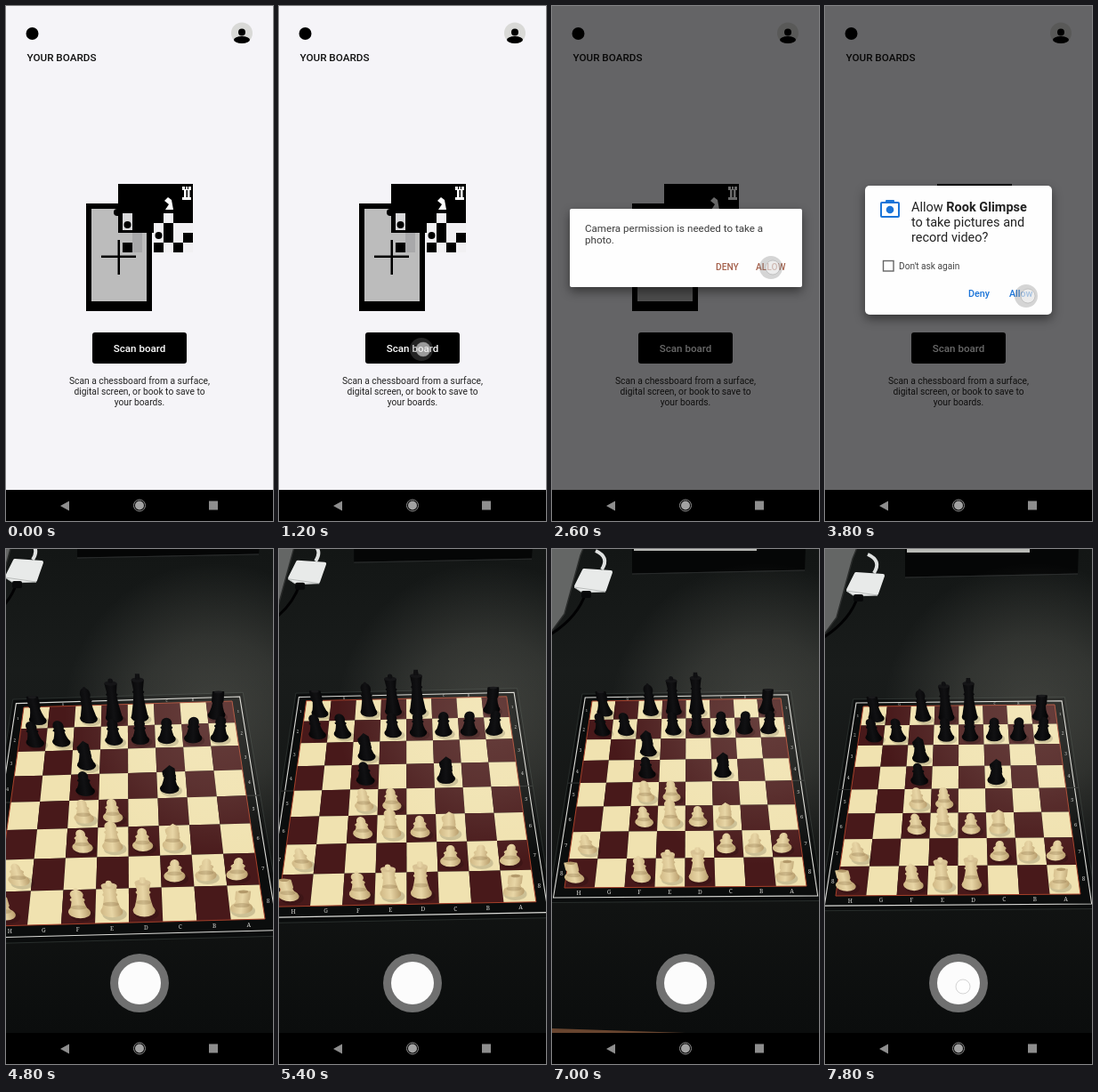
Recreate the animation shown at these times as an HTML page with a canvas. Size 300 by 579 pixels, loop 8000 ms.

```html
<!DOCTYPE html>
<html lang="en">
<head>
<meta charset="utf-8">
<title>Board scanner</title>
<style>
html, body { margin: 0; width: 100%; height: 100%; overflow: hidden; background: #000; }
canvas { display: block; width: 100%; height: 100%; }
</style>
</head>
<body>
<canvas id="stage"></canvas>
<script>
const W = 300, H = 579, LOOP = 8000, STEP = 200, NAV_TOP = 544;
const canvas = document.getElementById('stage');
const ctx = canvas.getContext('2d');
const ratio = window.devicePixelRatio || 1;
canvas.width = W * ratio;
canvas.height = H * ratio;

// ---------- drawing helpers ----------
function rect(x, y, w, h, color, radius = 0) {
  ctx.fillStyle = color;
  ctx.beginPath();
  ctx.roundRect(x, y, w, h, radius);
  ctx.fill();
}
function ellipse(x, y, rx, ry, color) {
  ctx.fillStyle = color;
  ctx.beginPath();
  ctx.ellipse(x, y, rx, ry, 0, 0, Math.PI * 2);
  ctx.fill();
}
const disc = (x, y, r, color) => ellipse(x, y, r, r, color);

function poly(points, fill, stroke, width = 1) {
  ctx.beginPath();
  points.forEach(([x, y]) => ctx.lineTo(x, y));
  ctx.closePath();
  if (fill) { ctx.fillStyle = fill; ctx.fill(); }
  if (stroke) { ctx.strokeStyle = stroke; ctx.lineWidth = width; ctx.stroke(); }
}
function curve(x0, y0, cx, cy, x1, y1, color, width) {
  ctx.beginPath();
  ctx.moveTo(x0, y0);
  ctx.quadraticCurveTo(cx, cy, x1, y1);
  ctx.strokeStyle = color;
  ctx.lineWidth = width;
  ctx.stroke();
}
function text(str, x, y, size, color, weight = 400, align = 'left', family = 'Roboto, sans-serif') {
  ctx.font = `${weight} ${size}px ${family}`;
  ctx.textAlign = align;
  ctx.fillStyle = color;
  ctx.fillText(str, x, y);
  return ctx.measureText(str).width;
}
function withAlpha(alpha, draw) {
  if (alpha <= 0) return;
  ctx.save();
  ctx.globalAlpha = alpha;
  draw();
  ctx.restore();
}
function card(x, y, w, h, radius) {
  ctx.save();
  ctx.shadowColor = 'rgba(0,0,0,.45)';
  ctx.shadowBlur = 12 * ratio;
  ctx.shadowOffsetY = 5 * ratio;
  rect(x, y, w, h, '#fefefe', radius);
  ctx.restore();
}
function touch(x, y, halo = 'rgba(120,120,120,.3)') {
  disc(x, y, 13, halo);
  disc(x + 2, y, 8, 'rgba(255,255,255,.55)');
  ctx.strokeStyle = 'rgba(150,150,150,.4)';
  ctx.lineWidth = 1;
  ctx.stroke();
}

// ---------- app screens ----------
function illustration() {
  rect(90, 222, 74, 121, '#000');
  rect(96, 228, 62, 104, '#bcbcbc');
  rect(126, 200, 84, 33, '#000');
  rect(121, 228, 10, 8, '#000', 4);
  rect(126, 233, 84, 22, '#000');
  [[177, 233], [166, 244], [188, 244], [199, 244], [166, 255], [188, 255], [177, 266], [199, 266]]
    .forEach(([x, y]) => rect(x, y, 11, 11, '#f1f0f3'));
  [[177, 255], [199, 255], [166, 266], [188, 266], [131, 266]]
    .forEach(([x, y]) => rect(x, y, 11, 11, '#000'));
  rect(131, 233, 11, 19, '#d8d8da');
  rect(142, 255, 11, 22, '#a8a8aa');
  disc(136.5, 246, 4, '#000');
  disc(171.5, 258, 4, '#000');
  // rook and knight outlines
  [[198, 203, 3, 4], [202, 203, 2, 4], [205, 203, 3, 4], [200, 206, 2.5, 10], [204, 206, 2.5, 10], [198, 215, 10, 3]]
    .forEach(([x, y, w, h]) => rect(x, y, w, h, '#fff'));
  poly([[178, 219], [182, 215], [186, 218], [188, 229], [179, 229], [183, 223]], '#fff');
  rect(107, 280.5, 39, 2.5, '#000');
  rect(125.5, 263, 2.5, 39, '#000');
}

function home() {
  rect(0, 0, W, H, '#f5f4f8');
  disc(29.5, 31, 7, '#000');
  text('YOUR BOARDS', 23.5, 62, 11.7, '#111', 500);
  disc(265, 30.5, 12, '#d9d9d7');
  disc(265, 29.5, 4, '#000');
  ellipse(265, 38, 9, 4, '#000');
  illustration();
  rect(97, 367, 106, 35, '#000', 3);
  text('Scan board', 150, 389, 11.6, '#fff', 500, 'center');
  ['Scan a chessboard from a surface,', 'digital screen, or book to save to', 'your boards.']
    .forEach((line, i) => text(line, 150, 424.5 + 12 * i, 10.25, '#222', 400, 'center'));
}

function permissionDialog() {
  card(20, 228, 261, 88, 2);
  text('Camera permission is needed to take a', 37, 253.5, 11.6, '#3c3c3c');
  text('photo.', 37, 267, 11.6, '#3c3c3c');
  text('DENY', 184, 297, 10.2, '#a5614c', 500);
  text('ALLOW', 229, 297, 10.2, '#a5614c', 500);
}

function systemDialog() {
  const blue = '#1b74d8';
  card(45, 202, 210, 145, 5);
  rect(68, 218, 10, 5, blue, 1);
  rect(62, 220, 22, 18, blue, 2);
  rect(64, 222, 18, 14, '#fefefe');
  disc(73, 229, 4.3, blue);
  const lead = text('Allow ', 97, 231, 14.5, '#222');
  text('Rook Glimpse', 97 + lead, 231, 14.5, '#222', 700);
  text('to take pictures and', 97, 248, 14.5, '#222');
  text('record video?', 97, 265, 14.5, '#222');
  ctx.strokeStyle = '#666';
  ctx.lineWidth = 1.4;
  ctx.strokeRect(65.5, 286.5, 11.5, 11.5);
  text("Don't ask again", 83, 296, 10.15, '#444');
  text('Deny', 161, 327, 10.8, blue, 500);
  text('Allow', 207, 327, 10.6, blue, 500);
}

function navBar() {
  rect(0, NAV_TOP, W, H - NAV_TOP, '#000');
  poly([[61, 562], [71, 556.5], [71, 567.5]], '#8e8e8e');
  disc(150, 561.5, 5, '#a2a2a2');
  ctx.beginPath();
  ctx.arc(150, 561.5, 6.5, 0, Math.PI * 2);
  ctx.strokeStyle = '#8e8e8e';
  ctx.lineWidth = 1;
  ctx.stroke();
  rect(228, 556.5, 10, 10, '#8e8e8e');
}

// ---------- camera view ----------
// time, playing-field corners (TL, TR, BR, BL), adapter centre, box bottom, table edge
const POSES = [
  [4800, 20, 178, 254, 171, 291, 416, -14, 424, 21, 24, 10, 610],
  [6200, 45, 161, 258, 159, 286, 371, 16, 373, 47, 28, 22, 531],
  [7000, 45, 171, 257, 168, 286, 379, 14, 381, 47, 35, 28, 539],
  [7800, 43, 177, 258, 175, 287, 388, 12, 390, 46, 39, 32, 560],
];
function poseAt(t) {
  if (t <= POSES[0][0]) return POSES[0].slice(1);
  const i = POSES.findIndex(p => p[0] >= t);
  const a = POSES[i - 1], b = POSES[i];
  const k = (t - a[0]) / (b[0] - a[0]);
  return a.slice(1).map((v, j) => v + (b[j + 1] - v) * k);
}

// maps board units 0..8 onto the four corners
function projection([x0, y0, x1, y1, x2, y2, x3, y3]) {
  const ax = x1 - x2, ay = y1 - y2, bx = x3 - x2, by = y3 - y2;
  const sx = x0 - x1 + x2 - x3, sy = y0 - y1 + y2 - y3;
  const det = ax * by - bx * ay;
  const g = (sx * by - bx * sy) / det, h = (ax * sy - sx * ay) / det;
  return (col, row) => {
    const u = col / 8, v = row / 8, d = g * u + h * v + 1;
    return [((x1 - x0 + g * x1) * u + (x3 - x0 + h * x3) * v + x0) / d,
            ((y1 - y0 + g * y1) * u + (y3 - y0 + h * y3) * v + y0) / d];
  };
}

const SETUP = ['r.bqk..r', 'pp.ppppp', '..n.....', '..p..n..', '..PP....', '..PBPN..', 'P....PPP', 'R.BQK..R'];
const HEIGHT = { p: 25, r: 27, n: 29, b: 34, q: 42, k: 45 };

function piece(symbol, x, y, w, scale) {
  const kind = symbol.toLowerCase(), white = symbol !== kind, h = HEIGHT[kind] * scale;
  const color = ctx.createLinearGradient(-w, 0, w, 0);
  (white ? ['#d0b885', '#e8d6a6', '#b89d6c'] : ['#050506', '#111113', '#020203'])
    .forEach((c, i) => color.addColorStop(i / 2, c));
  ctx.save();
  ctx.translate(x, y);
  ellipse(w * .2, -w * .25, w * 1.1, w * .6, 'rgba(0,0,0,.15)');
  ctx.transform(1, 0, (190 - x) * .0016, 1, 0, 0);
  ellipse(0, -w * .5, w, w * .55, color);
  ctx.beginPath();
  ctx.moveTo(-w * .95, -w * .5);
  ctx.quadraticCurveTo(-w * .6, -h * .4, -w * .48, -h * .72);
  ctx.lineTo(w * .48, -h * .72);
  ctx.quadraticCurveTo(w * .6, -h * .4, w * .95, -w * .5);
  ctx.fill();
  if (white) ellipse(0, -h * .36, w * .72, w * .2, 'rgba(120,90,50,.25)');
  ellipse(0, -h * .62, w * .68, w * .25, color);
  if (kind === 'p') disc(0, -h * .79, h * .21, color);
  if (kind === 'b') { ellipse(0, -h * .8, w * .6, h * .17, color); disc(0, -h * .96, w * .17, color); }
  if (kind === 'r') {
    rect(-w * .68, -h * .98, w * 1.36, h * .36, color, 1);
    ellipse(0, -h * .95, w * .45, w * .15, white ? '#b3996a' : '#1a1a1c');
  }
  if (kind === 'n') {
    poly([[-w * .5, -h * .45], [-w * .1, -h * .7], [-w * .7, -h * .64], [-w * .75, -h * .78],
          [0, -h], [w * .55, -h * .88], [w * .7, -h * .45]], color);
  }
  if (kind === 'q' || kind === 'k') {
    poly([[-w * .5, -h * .6], [-w * .72, -h * .87], [w * .72, -h * .87], [w * .5, -h * .6]], color);
    ellipse(0, -h * .87, w * .72, w * .27, white ? '#d8c294' : '#151517');
    disc(0, -h * .93, w * .28, color);
    if (kind === 'k') rect(-w * .25, -h, w * .5, h * .12, color);
  }
  ctx.restore();
}

// soft lamp reflection on the right of the table and board
function glare() {
  const light = ctx.createRadialGradient(235, 185, 0, 235, 185, 170);
  [.17, .11, 0].forEach((a, i) => light.addColorStop(i / 2, `rgba(255,250,230,${a})`));
  rect(0, 0, W, NAV_TOP, light);
}

function chessboard(corners) {
  const at = projection(corners);
  const quad = (l, t, r, b) => [at(l, t), at(r, t), at(r, b), at(l, b)];
  const scale = (corners[4] - corners[6]) / 270;
  const label = (str, col, row, size) => {
    const [x, y] = at(col, row);
    text(str, x, y + size * .35, size, '#d8d8d4', 400, 'center', '"Noto Serif", serif');
  };
  poly(quad(-.47, -.4, 8.47, 8.48), '#0b0d0d', '#303634', .8);
  poly(quad(-.32, -.2, 8.32, 8.32), null, '#dcdcd8', 1.1);
  [[-.47, 0], [8, 8.47]].forEach(([a, b]) => poly([at(a, 4), at(b, 4)], null, '#2c2f2e', .8));
  for (let row = 0; row < 8; row++) {
    for (let col = 0; col < 8; col++) {
      poly(quad(col, row, col + 1, row + 1), (row + col) % 2 ? '#48191a' : '#f0e2b0');
    }
  }
  poly(quad(0, 0, 8, 8), null, '#a6402a', 1);
  glare();
  [...'HGFEDCBA'].forEach((letter, i) => {
    label(letter, i + .5, 8.16, 6.5);
    label(letter, i + .5, -.1, 3.5);
    label(String(i + 1), -.17, i + .5, 4 + i * .35);
    label(String(i + 1), 8.17, i + .5, 4 + i * .35);
  });
  SETUP.forEach((line, row) => [...line].forEach((symbol, col) => {
    if (symbol === '.') return;
    // most pieces stand slightly towards the middle files; the corner rook stands outside
    const shift = symbol === 'R' && col === 0 ? -.15 : (3.2 - col) * .05;
    const [x, y] = at(col + .5 + shift, row + .83);
    const unit = at(col + 1, row + .83)[0] - at(col, row + .83)[0];
    piece(symbol, x, y, unit * .33, scale * (1.06 - .03 * row));
  }));
}

function tabletop([ax, ay, boxBottom, edge]) {
  const shade = ctx.createLinearGradient(0, 0, 0, NAV_TOP);
  [[0, '#131615'], [.25, '#191c1b'], [.65, '#131514'], [1, '#0b0d0d']]
    .forEach(([stop, c]) => shade.addColorStop(stop, c));
  rect(0, 0, W, H, shade);
  const left = boxBottom < 22 ? 80 + (boxBottom - 10) * .83 : 90;
  poly([[left, -5], [285, -5], [284, boxBottom - 4], [left, boxBottom]], '#050606');
  if (boxBottom > 24) rect(92, 0, 138, (boxBottom - 24) * .5, '#b9bab6');
  poly([[left, boxBottom], [284, boxBottom - 4]], null, '#2a2d2c', .8);
  poly([[0, edge], [W, edge + 10], [W, H], [0, H]], '#68452f');

  ctx.save();
  ctx.translate(ax, ay);
  poly([[-90, -60], [-2, -60], [-15, -28], [-33, 38], [-47, 57], [-90, 70]], '#646665', '#2b2d2c', 1.5);
  curve(-9, 14, -18, 42, -50, 62, '#020203', 3);
  curve(9, -12, 18, -26, 2, -33, '#dfe1e0', 4);
  ctx.lineJoin = 'round';
  poly([[-20, 7], [-11, -11], [19, -9], [12, 11], [-12, 12]], '#e8eae9', '#e8eae9', 4);
  poly([[-22, 8], [-13, 14], [13, 13]], null, '#b8bbba', 1);
  rect(-14, 12, 11, 8, '#08090a', 2);
  ctx.restore();
}

function camera(t) {
  rect(0, 0, W, H, '#000');
  if (t >= 4600) {
    const pose = poseAt(t);
    tabletop(pose.slice(8));
    chessboard(pose.slice(0, 8));
  }
  disc(150, 488, 33, 'rgba(150,150,150,.72)');
  disc(150, 488, 24, '#fcfcfc');
  if (t >= 7800) touch(153, 492, 'transparent');
}

// ---------- timeline ----------
function drawAt(time) {
  const t = Math.floor(time / STEP) * STEP;
  const during = (from, to) => t >= from && t < to;
  ctx.setTransform(ratio, 0, 0, ratio, 0, 0);
  if (t >= 4200) {
    camera(t);
  } else {
    const ramp = (from, to) => Math.max(0, Math.min(1, (t - from) / (to - from)));
    const closing = ramp(3800, 4200);
    home();
    if (during(1000, 1400)) touch(160, 386);
    withAlpha(.59 * ramp(1200, 1600) * (1 - closing), () => rect(0, 0, W, H, '#000'));
    withAlpha(ramp(1200, 1600) * (1 - ramp(2600, 3000)), permissionDialog);
    if (during(2600, 2800)) touch(246, 294);
    withAlpha(ramp(2800, 3200) * (1 - closing), systemDialog);
    if (during(3800, 4000)) touch(226, 326);
  }
  navBar();
}

const start = performance.now();
function frame() {
  drawAt((performance.now() - start) % LOOP);
  requestAnimationFrame(frame);
}
frame();
</script>
</body>
</html>
```
